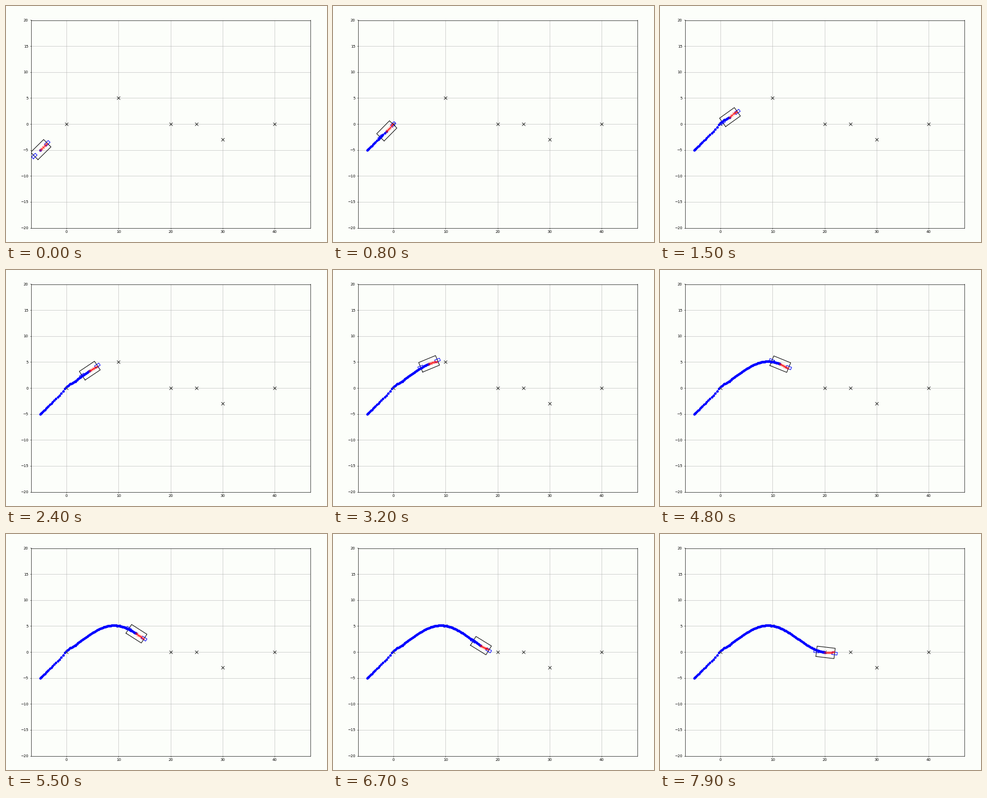
These frames come from a looping animation (600 px wide and 442 px high, 8000 ms). A matplotlib script:

```python
import numpy as np
import matplotlib.pyplot as plt
from matplotlib.animation import FuncAnimation

FRAMES, INTERVAL = 80, 100
W, H, DPI = 600, 442, 50
PAPER = "#fcfefa"
LENGTH, WIDTH = 3.5, 2.0
WHEEL_LENGTH, WHEEL_WIDTH = 1.0, 0.5
NOSE = 0.1              # body centre ahead of the tracked point
REACH, PLAN_STEPS = 1.7, 9
SUBSTEPS = 2

TARGETS = [(0, 0), (10, 5), (20, 0), (25, 0), (30, -3), (40, 0)]
APPROACH = [(-5, -5), (-0.75, -0.8), (0, 0.25), (0.7, 0.75),
            (1.75, 1.27), (2.3, 1.83)]


def route(x):
    """Height of the driven path: a straight approach, then one long wave."""
    wave = 2.51 + 2.61 * np.cos(0.27 * (x - 9.1))
    return np.where(x > APPROACH[-1][0], wave, np.interp(x, *zip(*APPROACH)))


def travel(t):
    """Speed up towards the first target, then cruise."""
    launch = -5 + 5.1 * np.minimum(t / 10, 1) ** 1.5
    cruise = np.interp(t, (10, 15, 43, 79), (0.1, 1.75, 10.0, 20.1))
    return np.where(t < 10, launch, cruise)


def heading(x, span=0.7):
    back, front = max(x - span, APPROACH[0][0]), x + span
    return np.arctan2(route(front) - route(back), front - back)


def box(x, y, yaw, length, width, ahead):
    """Closed outline of a rectangle shifted along its heading."""
    u = ahead + np.array([-1, 1, 1, -1, -1]) * length / 2
    v = np.array([-1, -1, 1, 1, -1]) * width / 2
    c, s = np.cos(yaw), np.sin(yaw)
    return x + u * c - v * s, y + u * s + v * c


plt.rcParams["axes.linewidth"] = 1.0
fig = plt.figure(figsize=(W / DPI, H / DPI), dpi=DPI, facecolor=PAPER)
ax = fig.add_axes([46.5 / W, 26.5 / H, 522 / W, 389 / H], facecolor=PAPER)
half = 20 * 522 / 389
ax.set_xlim(20 - half, 20 + half)
ax.set_ylim(-20, 20)
ax.set_xticks(range(0, 41, 10))
ax.set_yticks(range(-20, 21, 5))
ax.grid(True)

ax.plot(*zip(*TARGETS), "xk", ms=10, mew=1.2)
body, = ax.plot([], [], "-k")
wheels = [ax.plot([], [], "-b")[0] for _ in range(2)]
trail, = ax.plot([], [], "o-b", ms=5.5)
plan, = ax.plot([], [], "xr", ms=6)


def update(frame):
    x = float(travel(frame))
    y, yaw = route(x), heading(x)
    body.set_data(*box(x, y, yaw, LENGTH, WIDTH, NOSE))
    for wheel, side in zip(wheels, (-1, 1)):
        wheel.set_data(*box(x, y, yaw, WHEEL_LENGTH, WHEEL_WIDTH,
                            NOSE + side * LENGTH / 2))
    past = travel(np.arange(frame * SUBSTEPS + 1) / SUBSTEPS)
    trail.set_data(past, route(past))
    ahead = x + np.linspace(0, REACH * np.cos(yaw), PLAN_STEPS)
    plan.set_data(ahead, route(ahead))
    return [body, *wheels, trail, plan]


anim = FuncAnimation(fig, update, frames=FRAMES, interval=INTERVAL,
                     repeat=True, repeat_delay=0)
plt.show()
```
